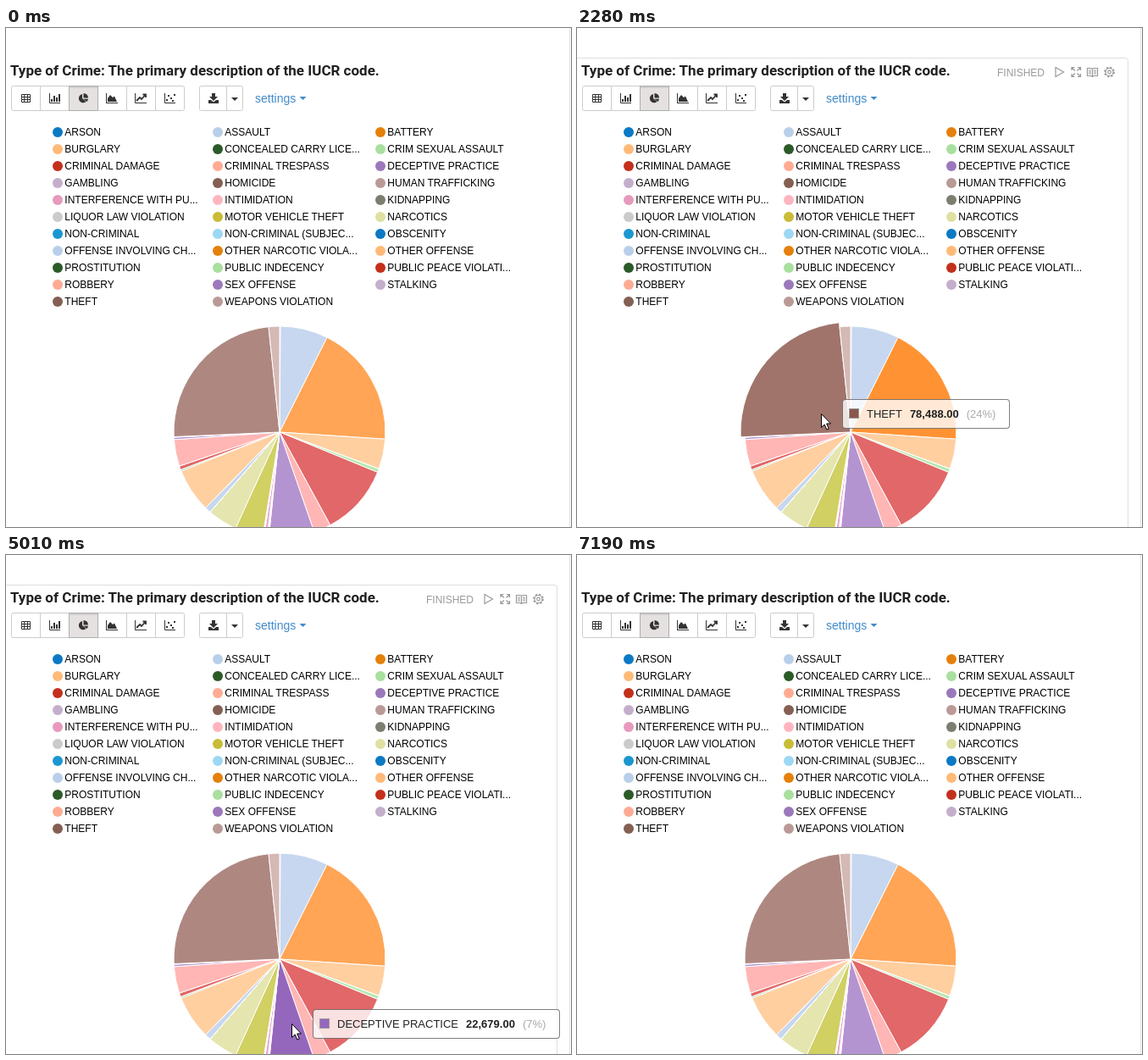
An HTML page that plays this animation: 667 px wide and 589 px high, repeating every 8.67 s.

```html
<!DOCTYPE html>
<html lang="en">
<head>
<meta charset="utf-8">
<title>Type of Crime</title>
<style>
html, body { margin: 0; width: 100%; height: 100%; overflow: hidden; background: #fff; }
svg { position: absolute; left: 0; top: 0; }
text { font: 12px "Liberation Sans", Arial, sans-serif; }
.title { font: 700 17px Roboto, sans-serif; fill: #212121; }
.settings { font-size: 14px; fill: #428bca; }
.btn { fill: #fff; stroke: #ccc; }
.icon { fill: #333; stroke: none; }
.line { fill: none; stroke: #333; }
#controls { fill: none; stroke: #999; stroke-width: 1.2; }
#pie path { stroke: #fff; stroke-width: 1; }
#tip {
  position: absolute; left: 0; top: 0; box-sizing: border-box; height: 35px;
  padding: 0 16px 0 28px; border: 1px solid rgba(0, 0, 0, .5); border-radius: 4px;
  background: rgba(255, 255, 255, .8); color: #222; white-space: nowrap;
  font: 13px/33px "Liberation Sans", Arial, sans-serif;
}
#tip i { position: absolute; left: 7px; top: 10px; width: 10px; height: 10px; border: 1px solid #999; }
#tip b { margin: 0 9px; }
#tip em { font-style: normal; color: #aaa; }
</style>
</head>
<body>
<svg width="667" height="589">
  <path d="M665.5 0V589" stroke="#e2e2e2"/>
  <rect id="frame" x="-10" y="35.5" width="660.5" height="600" rx="3" fill="none" stroke="#ddd"/>
  <text class="title" x="5" y="56">Type of Crime: The primary description of the IUCR code.</text>

  <g id="controls">
    <text x="496" y="57" fill="#999" stroke="none">FINISHED</text>
    <path d="M565 46.5V57.5L574.5 52Z"/>
    <path d="M584 50V46.500H587.500M584 46.500L588 50.500M591 46.500H594.500V50M594.500 46.500L590.500 50.500M584 54V57.500H587.500M584 57.500L588 53.500M591 57.500H594.500V54M594.500 57.500L590.500 53.500"/>
    <path d="M602.500 47.500H607Q608.500 47.500 608.500 49Q608.500 47.500 610 47.500H614.500V56.500H610L608.500 57.500L607 56.500H602.500ZM608.500 49V57M604 50H607M604 52H607M604 54H607M610 50H613M610 52H613M610 54H613"/>
    <circle cx="628.500" cy="52" r="4.500"/>
    <circle cx="628.500" cy="52" r="5.500" stroke-width="1.800" stroke-dasharray="2.160"/>
    <circle cx="628.500" cy="52" r="1.800"/>
  </g>

  <rect class="btn" x="6.5" y="68.500" width="204" height="29" rx="2"/>
  <path class="btn" d="M40.500 69V97M108.500 69V97M142.500 69V97M176.500 69V97"/>
  <rect x="74.500" y="68.500" width="34" height="29" fill="#e6e1e1" stroke="#adadad"/>
  <path d="M75 70H108" stroke="#d2cdcd" stroke-width="2"/>
  <rect class="btn" x="228.500" y="68.500" width="51" height="29" rx="2"/>
  <path class="btn" d="M260.500 69V97"/>
  <path class="line" d="M18.500 78.500H28.500V87.500H18.500ZM18.500 81.500H28.500M18.500 84.500H28.500M21.500 79V87M25.500 79V87"/>
  <path class="line" d="M51.500 77V88.500H64"/>
  <path class="icon" d="M53 84h2v3h-2zM56 80h2v7h-2zM59 82h2v5h-2zM62 78h2v9h-2z"/>
  <path class="icon" d="M90 78A5.200 5.200 0 1 0 94.500 87L90 83ZM91.500 77A5.500 5.500 0 0 1 97 82.500H91.500ZM91.500 83.800H97A5.500 5.500 0 0 1 95.300 87Z"/>
  <path class="icon" d="M118 77h1v11h13v1h-14zM120 87V83L123 79L126 82L128 80.500L131 87Z"/>
  <path class="line" d="M152.500 77V88.500H166"/>
  <path class="line" stroke-width="1.800" d="M154 86L158 82L160 84L164.500 79M161.500 78.500H165V82"/>
  <path class="line" d="M187.500 77V88.500H200"/>
  <path class="icon" d="M189 84h2v2h-2zM191 79h2v2h-2zM194 82h2v2h-2zM196 85h2v2h-2zM198 78h2v2h-2z"/>
  <path class="icon" d="M243 77h4v4h3l-5 5l-5-5h3zM239 85h3l3 2.500l3-2.500h3v4h-12z"/>
  <path class="icon" d="M266 82h8l-4 4z"/>
  <text class="settings" x="294" y="88">settings</text>
  <path fill="#428bca" d="M346.500 81h8l-4 4z"/>
  <g id="legend"></g>
  <g id="pie"></g>
</svg>
<div id="tip"><i></i><span></span><b></b><em></em></div>
<svg width="667" height="589">
  <path id="cursor" d="M.5 .5V16.500L4.200 13L6.800 19L9.300 18L6.700 12H11.500Z" fill="#fff" stroke="#000"/>
</svg>

<script>
const LOOP = 8670, CX = 323, CY = 477, R = 125, GROW = 5;
const names = `ARSON,ASSAULT,BATTERY,BURGLARY,CONCEALED CARRY LICE...,CRIM SEXUAL ASSAULT,CRIMINAL DAMAGE,CRIMINAL TRESPASS,DECEPTIVE PRACTICE,GAMBLING,HOMICIDE,HUMAN TRAFFICKING,INTERFERENCE WITH PU...,INTIMIDATION,KIDNAPPING,LIQUOR LAW VIOLATION,MOTOR VEHICLE THEFT,NARCOTICS,NON-CRIMINAL,NON-CRIMINAL (SUBJEC...,OBSCENITY,OFFENSE INVOLVING CH...,OTHER NARCOTIC VIOLA...,OTHER OFFENSE,PROSTITUTION,PUBLIC INDECENCY,PUBLIC PEACE VIOLATI...,ROBBERY,SEX OFFENSE,STALKING,THEFT,WEAPONS VIOLATION`.split(',');
const counts = [440, 23700, 60902, 14950, 20, 1800, 35481, 8550, 22679, 350, 500, 10, 1500, 130, 200, 300,
  14000, 14800, 40, 4, 60, 2950, 10, 21800, 700, 12, 1900, 13300, 1150, 230, 78488, 5400];
const hexes = s => s.split(' ').map(c => '#' + c);
const fills = hexes('1f77b4 aec7e8 ff7f0e ffbb78 2ca02c 98df8a d62728 ff9896 9467bd c5b0d5 8c564b c49c94 e377c2 f7b6d2 7f7f7f c7c7c7 bcbd22 dbdb8d 17becf 9edae5');
const dots = hexes('0b79c4 b9cfe9 e5800b ffba78 2c5a28 a9df9f c3301c ffab93 9b78bb c4aecb 845f53 ba9a96 e79abd ffb5bf 7d7e70 cbcbcb c9bc37 dee1a2 1b97d0 9dd8f3');

// cursor path: time, x, y
const path = [[480, 452, 610], [680, 437, 500], [880, 402, 462], [960, 398, 455],
  [2030, 398, 455], [2150, 330, 455], [2275, 288, 455],
  [3205, 288, 455], [3430, 299, 528], [3515, 317.5, 533], [3535, 322, 535], [3620, 334, 551], [3780, 336, 553],
  [4990, 336, 553], [5010, 337, 553], [5244, 380, 545], [5400, 403, 532],
  [6780, 403, 532], [6900, 450, 535], [7110, 668, 540]];
// bursts of motion: start, end, steps
const bursts = [[500, 1190, 10], [2050, 2430, 6], [3220, 3850, 9], [5010, 5480, 7], [6800, 7190, 6]];

const $ = id => document.getElementById(id);
const clamp = v => Math.max(0, Math.min(1, v));
function add(parent, tag, attrs) {
  const el = document.createElementNS('http://www.w3.org/2000/svg', tag);
  for (const k in attrs) el.setAttribute(k, attrs[k]);
  return parent.appendChild(el);
}

const total = counts.reduce((a, b) => a + b);
let sum = 0;
const slices = counts.map((n, i) => {
  const x = [61, 250, 442][i % 3], y = 123 + 20 * Math.floor(i / 3);
  add($('legend'), 'circle', { cx: x, cy: y, r: 6, fill: dots[i % 20] });
  add($('legend'), 'text', { x: x + 8.3, y: y + 4 }).textContent = names[i];
  const from = sum / total * 2 * Math.PI;
  sum += n;
  return { from, to: sum / total * 2 * Math.PI, el: add($('pie'), 'path', { fill: fills[i % 20] }) };
});

function cursorAt(t) {
  const k = path.findIndex(p => p[0] > t);
  if (k < 1) return null;
  const [a, b] = [path[k - 1], path[k]], u = (t - a[0]) / (b[0] - a[0]);
  return { x: a[1] + (b[1] - a[1]) * u, y: a[2] + (b[2] - a[2]) * u };
}

function sliceAt(p) {
  if (!p || Math.hypot(p.x - CX, p.y - CY) > R) return -1;
  const a = (Math.atan2(p.x - CX, CY - p.y) + 2 * Math.PI) % (2 * Math.PI);
  return slices.findIndex(s => a < s.to);
}

const hovers = [{ t: 0, i: -1 }];
for (let t = 0; t < LOOP; t += 2) {
  const i = sliceAt(cursorAt(t));
  if (i !== hovers[hovers.length - 1].i) hovers.push({ t, i });
}

// hover progress of a slice, linear both ways
function level(i, t, span) {
  let v = 0;
  hovers.forEach((h, k) => {
    if (h.t > t) return;
    const end = Math.min(t, k + 1 < hovers.length ? hovers[k + 1].t : LOOP);
    v = clamp(v + (h.i === i ? 1 : -1) * (end - h.t) / span);
  });
  return v;
}

function arc(s, r) {
  const pt = a => `${CX + r * Math.sin(a)} ${CY - r * Math.cos(a)}`;
  return `M${CX} ${CY}L${pt(s.from)}A${r} ${r} 0 0 1 ${pt(s.to)}Z`;
}

function stepped(t) {
  for (const [a, b, n] of bursts) {
    const dt = (b - a) / (n - 1);
    if (t >= a && t < b) return a + Math.floor((t - a) / dt + .1) * dt;
  }
  return t;
}

const tip = $('tip'), [swatch, label, value, share] = tip.children;
function drawTip(t) {
  const past = hovers.filter(h => h.t <= t);
  let h = past.pop(), alpha = 1, at = t;
  if (h.i < 0 && past.length) {
    alpha = clamp(1 - (t - h.t) / 200);
    at = h.t;
    h = past.pop();
  }
  const p = cursorAt(at);
  tip.style.opacity = h.i < 0 || !p ? 0 : alpha;
  if (h.i < 0 || !p) return;
  swatch.style.background = fills[h.i % 20];
  label.textContent = names[h.i];
  value.textContent = counts[h.i].toLocaleString('en-US') + '.00';
  share.textContent = `(${Math.round(counts[h.i] / total * 100)}%)`;
  const w = tip.offsetWidth;
  const x = p.x + 25 + w > 660 ? p.x - 26 - w : p.x + 25;
  tip.style.transform = `translate(${Math.round(x)}px, ${Math.round(p.y - 17)}px)`;
}

function draw(now) {
  const t = stepped(now % LOOP), p = cursorAt(t);
  slices.forEach((s, i) => {
    s.el.setAttribute('d', arc(s, R + GROW * level(i, t, 70)));
    s.el.setAttribute('fill-opacity', .7 + .3 * level(i, t, 250));
  });
  const inside = p && p.x < 651 ? 'visible' : 'hidden';
  $('frame').style.visibility = $('controls').style.visibility = inside;
  $('cursor').style.visibility = p ? 'visible' : 'hidden';
  if (p) $('cursor').setAttribute('transform', `translate(${Math.round(p.x)} ${Math.round(p.y)})`);
  drawTip(t);
}

const start = performance.now();
function tick() {
  draw(performance.now() - start);
  requestAnimationFrame(tick);
}
tick();
</script>
</body>
</html>
```
